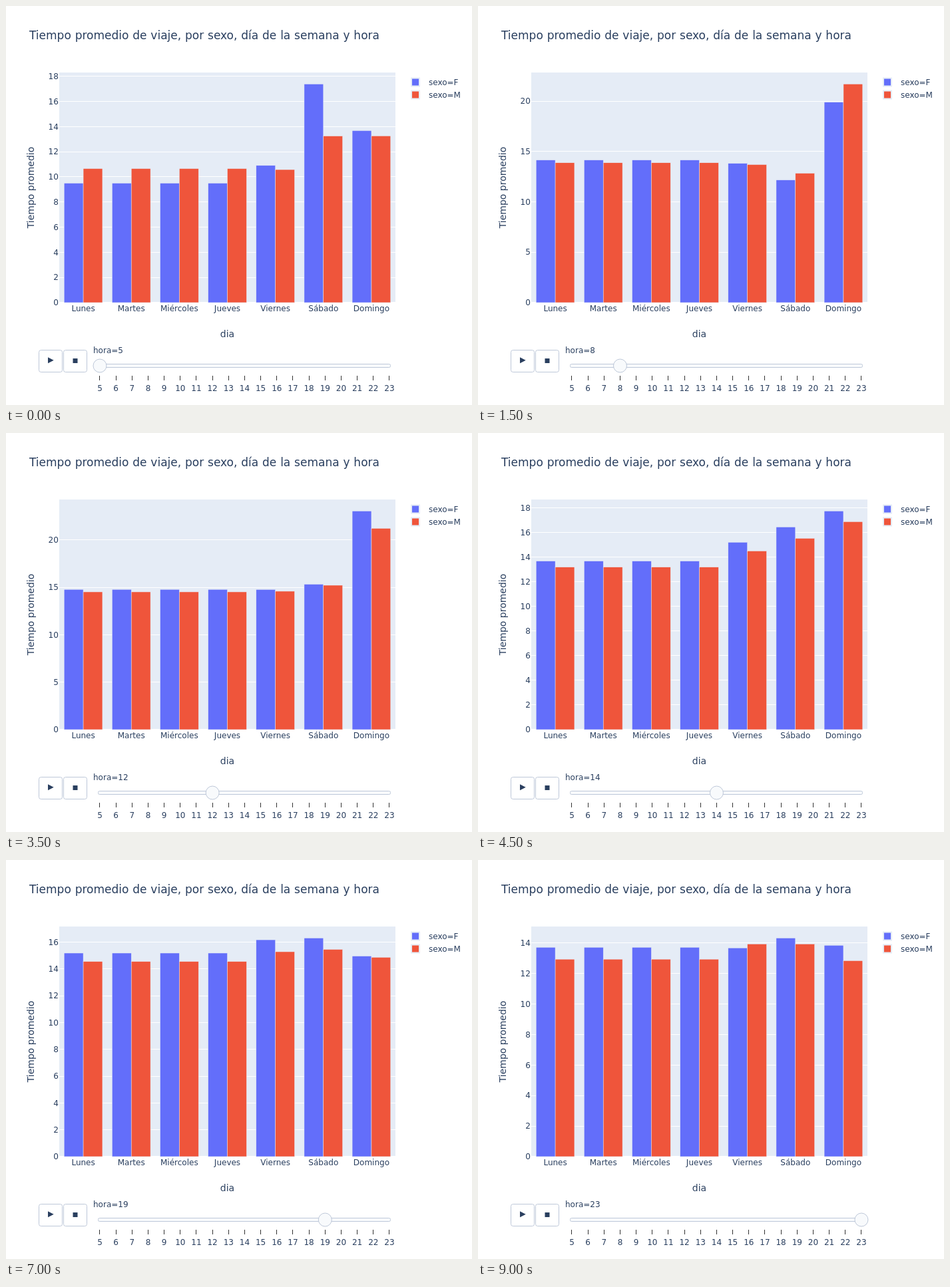
An HTML page for the animation above (9.5 s loop, 700x600 px).

```html
<!DOCTYPE html>
<html lang="es">
<head>
<meta charset="utf-8">
<style>
html, body { margin: 0; width: 100%; height: 100%; overflow: hidden; background: #fff; }
svg { display: block; font: 12px Verdana, "DejaVu Sans", sans-serif; }
text { fill: #2a3f5f; white-space: pre; }
.control { fill: #f8fafc; stroke: #bec8d9; }
.crisp { shape-rendering: crispEdges; }
</style>
</head>
<body>
<svg id="stage" width="700" height="600" viewBox="0 0 700 600"></svg>
<script>
const STEP = 500, FIRST = 5, COUNT = 19;
const LEFT = 80, RIGHT = 585, TOP = 100, BASE = 446;
const DAYS = ['Lunes', 'Martes', 'Miércoles', 'Jueves', 'Viernes', 'Sábado', 'Domingo'];
const COLORS = ['#636efa', '#ef553b'];

// Key hours: F and M averages for Monday to Thursday, Friday, Saturday, Sunday
const KEYS = {
  5: [9.5, 10.66, 10.91, 10.58, 17.39, 13.25, 13.68, 13.26],
  8: [14.15, 13.88, 13.82, 13.7, 12.17, 12.84, 19.9, 21.7],
  12: [14.78, 14.52, 14.77, 14.59, 15.33, 15.22, 23.05, 21.22],
  14: [13.69, 13.2, 15.22, 14.51, 16.46, 15.54, 17.76, 16.89],
  17: [16.15, 15.4, 16.8, 15.92, 15.9, 15.16, 16.08, 15.96],
  21: [14.23, 13.72, 15.56, 14.66, 16.73, 15.77, 13.85, 13.79],
  23: [13.72, 12.94, 13.68, 13.94, 14.33, 13.94, 13.85, 12.84]
};
const HOURS = Object.keys(KEYS).map(Number);

// Values between key hours lie on a straight line
function valuesAt(hour) {
  const next = Math.max(1, HOURS.findIndex(h => h >= hour));
  const from = HOURS[next - 1], to = HOURS[next];
  const part = (hour - from) / (to - from);
  const groups = KEYS[from].map((v, i) => v + (KEYS[to][i] - v) * part);
  return DAYS.flatMap((_, day) => {
    const group = 2 * Math.max(0, day - 3);
    return groups.slice(group, group + 2);
  });
}

const text = (x, y, s, anchor = 'start', more = '') =>
  `<text x="${x}" y="${y}" text-anchor="${anchor}" ${more}>${s}</text>`;
const rect = (x, y, w, h, more) =>
  `<rect x="${x}" y="${y}" width="${w}" height="${h}" ${more}/>`;
const line = (x1, y1, x2, y2, color, width = 1) =>
  `<path class="crisp" d="M${x1} ${y1}L${x2} ${y2}" stroke="${color}" stroke-width="${width}"/>`;
const sliderX = hour => 140.98 + (hour - FIRST) * 24.165;

function chart(hour) {
  const values = valuesAt(hour);
  const range = Math.max(...values) / .95;
  const scale = (BASE - TOP) / range;
  const gap = range / 9.65 > 2 ? 5 : 2;
  const slot = (RIGHT - LEFT) / DAYS.length, barWidth = slot * .4;
  let out = rect(LEFT, TOP, RIGHT - LEFT, BASE - TOP, 'fill="#e5ecf6"');
  for (let n = 0; n <= range; n += gap) {
    const y = BASE - n * scale, lineY = Math.floor(y) + (n ? .5 : 0);
    out += line(LEFT, lineY, RIGHT, lineY, '#fff', n ? 1 : 2);
    out += text(78.8, y + 4.2, n, 'end');
  }
  values.forEach((v, i) => {
    const x = LEFT + slot * (Math.floor(i / 2) + .1) + (i % 2) * barWidth;
    out += rect(x, BASE - v * scale, barWidth, v * scale,
      `fill="${COLORS[i % 2]}" stroke="#e5ecf6" stroke-width=".5"`);
  });
  DAYS.forEach((day, i) => out += text(LEFT + slot * (i + .5), 459, day, 'middle'));
  return out;
}

function labels() {
  let out = text(35, 50, 'Tiempo promedio de viaje, por sexo, día de la semana y hora', 'start',
    'font-size="17" word-spacing=".45"');
  out += text(332.5, 498, 'dia', 'middle', 'font-size="14"');
  out += text(0, 0, 'Tiempo promedio', 'middle', 'font-size="14" transform="translate(42 273) rotate(-90)"');
  ['F', 'M'].forEach((sex, i) => {
    out += rect(609, 108.5 + 19 * i, 12, 12, `fill="${COLORS[i]}" stroke="#e5ecf6" stroke-width="2"`);
    out += text(635, 119 + 19 * i, 'sexo=' + sex);
  });
  return out;
}

function controls(hour) {
  let out = '';
  for (const x of [49.5, 86.5]) out += rect(x, 517.5, 35, 33, 'rx="3" fill="#fff" stroke="#bec8d9"');
  out += '<path d="M63 528.3L71.7 532.8L63 537.3Z" fill="#2a3f5f"/>';
  out += rect(100.5, 530, 7, 7, 'fill="#2a3f5f"');
  out += text(131, 522, 'hora=' + hour);
  out += rect(138.5, 538.5, 439, 5, 'rx="2" class="control"');
  for (let h = FIRST; h < FIRST + COUNT; h++) {
    const x = sliderX(h), tickX = Math.floor(x) + .5;
    out += line(tickX, 556, tickX, 563, '#333');
    out += text(x, 579, h, 'middle');
  }
  return out + `<circle cx="${sliderX(hour)}" cy="541" r="10" class="control"/>`;
}

const stage = document.getElementById('stage');
let shown;
function draw() {
  const hour = FIRST + Math.floor(performance.now() / STEP) % COUNT;
  if (hour !== shown) {
    stage.innerHTML = chart(hour) + labels() + controls(hour);
    shown = hour;
  }
  requestAnimationFrame(draw);
}
draw();
</script>
</body>
</html>
```
